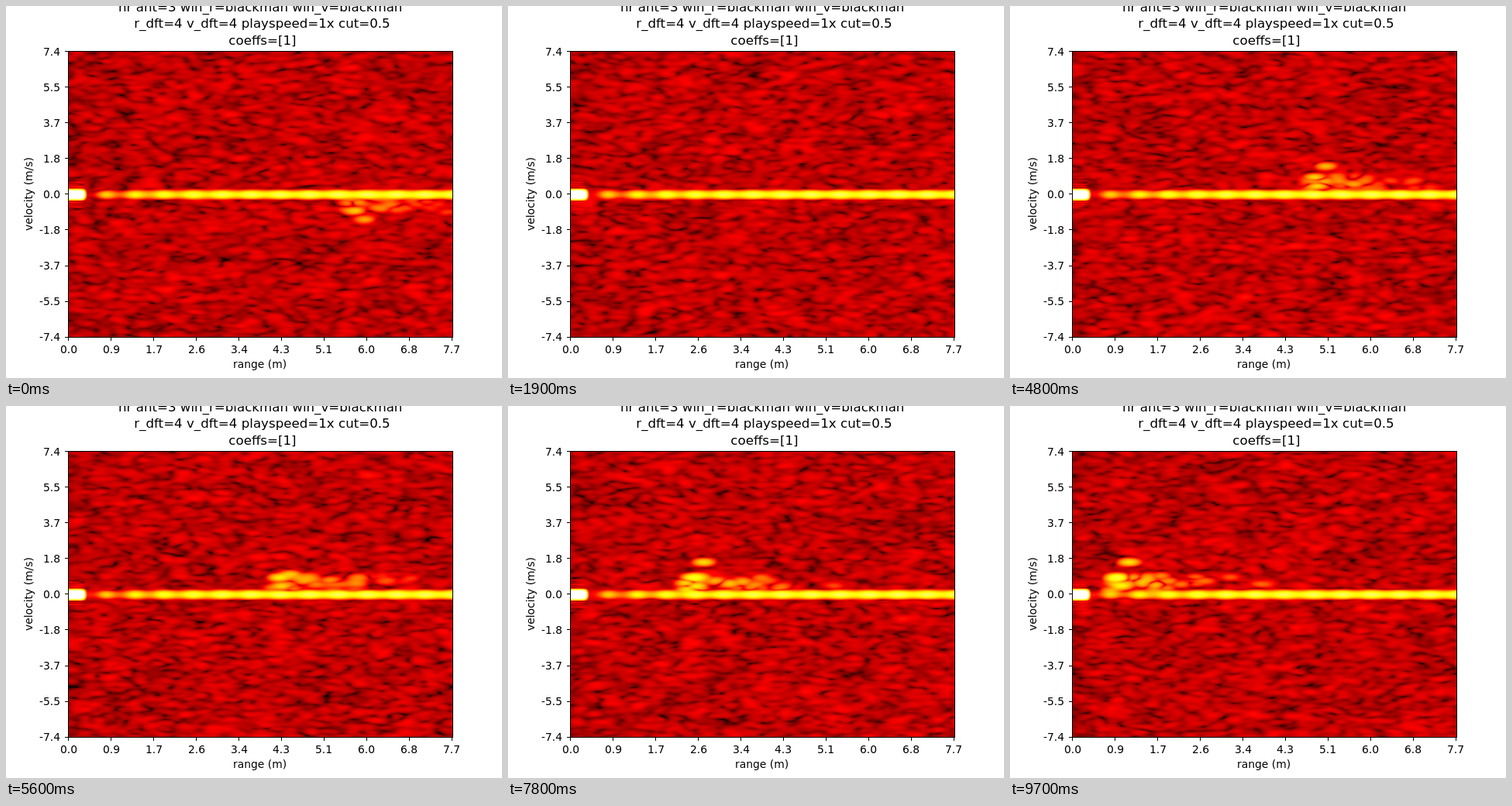
These frames come from a looping animation (640 px wide and 480 px high, 9800 ms). An HTML page with a canvas:

```html
<!DOCTYPE html>
<html lang="en">
<head>
<meta charset="utf-8">
<title>Range-velocity map</title>
<style>
  html, body { margin: 0; width: 100%; height: 100%; overflow: hidden; background: #fff; }
  canvas, svg { position: absolute; left: 0; top: 0; }
  text { font-family: "DejaVu Sans", sans-serif; font-size: 13.89px; white-space: pre; }
  .title { font-size: 16.67px; }
</style>
</head>
<body>
<canvas id="stage" width="640" height="480"></canvas>
<svg id="labels" width="640" height="480" viewBox="0 0 640 480"></svg>
<script>
const LOOP = 9800, STEP = 100;
const PLOT = { x: 81, y: 59, w: 495, h: 368 };
const RANGE_BINS = 64, VEL_BINS = 128, OVER = 4, TAPS = 6;
const COLS = RANGE_BINS * OVER, ROWS = VEL_BINS * OVER, MID = ROWS / 2;
const COL_PX = PLOT.w / COLS, ROW_PX = PLOT.h / ROWS;
const FLOOR = 0.268, DECADE = 0.28;   // colour level of the noise median and per factor of ten
const NOISE = 0.632;

const ctx = document.getElementById('stage').getContext('2d');
const labels = document.getElementById('labels');
const map = document.createElement('canvas');
map.width = COLS;
map.height = ROWS;
const mapCtx = map.getContext('2d');
const image = mapCtx.createImageData(COLS, ROWS);
const pixels = new Uint32Array(image.data.buffer);

const clamp = v => Math.max(0, Math.min(1, v));
const mix = (a, b, u) => a + (b - a) * u;
const wave = turns => Math.cos(2 * Math.PI * turns);
const amplitude = level => 10 ** ((level - FLOOR) / DECADE);

function randomFrom(seed) {
  let s = seed | 0;
  return () => {
    s = s + 0x6D2B79F5 | 0;
    let n = Math.imul(s ^ s >>> 15, 1 | s);
    n = n + Math.imul(n ^ n >>> 7, 61 | n) ^ n;
    return ((n ^ n >>> 14) >>> 0) / 4294967296;
  };
}

// Spectrum of a Blackman window, in bins, with peak 1.
const sinc = x => Math.abs(x) < 1e-9 ? 1 : Math.sin(Math.PI * x) / (Math.PI * x);
const lobe = d => (0.42 * sinc(d) + 0.25 * (sinc(d - 1) + sinc(d + 1)) +
                   0.04 * (sinc(d - 2) + sinc(d + 2))) / 0.42;
const phases = Array.from({ length: OVER }, (_, p) =>
  Array.from({ length: TAPS }, (_, k) => lobe(p / OVER - (k - 2))));

// "Hot" colour ramp.
const ramp = Uint32Array.from({ length: 1024 }, (_, i) => {
  const v = i / 1023;
  const channel = c => Math.round(255 * clamp(c));
  const r = channel(0.0416 + 0.9584 * v / 0.365);
  const g = channel((v - 0.365) / 0.381);
  const b = channel((v - 0.746) / 0.254);
  return 255 << 24 | b << 16 | g << 8 | r;
});

// Static echo on the zero-velocity line: a saturated start, then a rippled band.
function echoLevel(x) {
  const near = 1.2 - 0.35 * ((x - PLOT.x) / 20) ** 8;
  const fade = Math.exp(-(x - 110) / 65);
  const band = 0.8 - 0.3 * fade + (0.04 + 0.09 * fade) * wave((x - 128) / 37.5);
  return x < 106 ? Math.max(near, 0.33) : band;
}
const echo = Float32Array.from({ length: COLS }, (_, c) => amplitude(echoLevel(PLOT.x + c * COL_PX)));

// Reflecting parts of the walker: x, height above zero velocity, level.
function walkerParts(t, random) {
  const pace = Math.tanh(t - 1.9);               // walks off, turns, comes back
  const travel = 0.35 * Math.log(1 + Math.exp((t - 3.75) / 0.35));
  const x = 448 - 52 * travel, h = 22 * pace;
  const stride = 1.4 + 0.5 * wave((t - 7.8) / 0.95);
  const closeness = 0.08 * clamp(travel / 5);
  const parts = [];
  const add = (dx, height, level) =>
    parts.push([x + dx, height, mix(0.2, level + closeness, Math.abs(pace))]);

  add(0, h, 0.69);
  add(4, h * 0.5, 0.66);
  add(14, h * stride, 0.63);
  for (let n = 0; n < 5; n++) add(30 + 17 * n, h * (0.8 - 0.2 * (n % 2)), 0.56 - 0.03 * n);
  for (let n = 0; n < 24; n++) {
    const behind = 200 * random() ** 2;
    add(behind - 8, h * (0.2 + 0.9 * random()), 0.55 - 0.0009 * behind);
  }
  return parts;
}

const ANTENNAS = 2;
const bins = new Float32Array(RANGE_BINS * VEL_BINS);
const wide = new Float32Array(COLS * VEL_BINS);
const fields = Array.from({ length: 2 * ANTENNAS }, () => new Float32Array(COLS * ROWS));
const [re, im] = fields;

// Interpolates one line of bins to OVER times as many samples.
function expand(src, dst, count, start, stride) {
  for (let o = 0; o < count * OVER; o++) {
    const weights = phases[o % OVER], first = (o / OVER | 0) - 2 + count;
    let sum = 0;
    for (let k = 0; k < TAPS; k++) sum += weights[k] * src[start + (first + k) % count * stride];
    dst[start * (stride === 1 ? OVER : 1) + o * stride] = sum;
  }
}

function addNoise(random) {
  for (const field of fields) {
    for (let i = 0; i < bins.length; i++) {
      bins[i] = NOISE * (random() + random() + random() - 1.5);
    }
    for (let v = 0; v < VEL_BINS; v++) expand(bins, wide, RANGE_BINS, v * RANGE_BINS, 1);
    for (let c = 0; c < COLS; c++) expand(wide, field, VEL_BINS, c, COLS);
  }
}

function addEcho() {
  for (let dr = -36; dr <= 36; dr++) {
    const weight = lobe(dr / OVER);
    for (let c = 0; c < COLS; c++) re[(MID + dr) * COLS + c] += weight * echo[c];
  }
}

function addReflection([x, up, level], phase) {
  const col = (x - PLOT.x) / COL_PX, row = MID - up / ROW_PX, reach = 3 * OVER;
  const a = amplitude(level) * Math.cos(phase), b = amplitude(level) * Math.sin(phase);
  for (let r = Math.ceil(row - reach); r <= row + reach; r++) {
    const weight = lobe((r - row) / OVER);
    for (let c = Math.max(0, Math.ceil(col - reach)); c <= Math.min(COLS - 1, col + reach); c++) {
      const w = weight * lobe((c - col) / OVER), i = r * COLS + c;
      re[i] += a * w;
      im[i] += b * w;
    }
  }
}

function render(step) {
  const random = randomFrom(step * 7919 + 17);
  addNoise(random);
  addEcho();
  walkerParts(step * STEP / 1000, random)
    .forEach(part => addReflection(part, 2 * Math.PI * random()));
  for (let i = 0; i < pixels.length; i++) {
    let power = 1e-6;
    for (const field of fields) power += field[i] * field[i];
    const edge = 0.035 * Math.exp(-(i % COLS) / 6);
    const level = FLOOR + DECADE / 2 * Math.log10(power) - edge;
    pixels[i] = ramp[Math.round(1023 * clamp(level))];
  }
  mapCtx.putImageData(image, 0, 0);
  ctx.drawImage(map, PLOT.x, PLOT.y, PLOT.w, PLOT.h);
}

// Places text on whole pixels; align is 0.5 for centred and 1 for right-aligned.
function label(text, x, y, { align = 0.5, className = '', turn = 0 } = {}) {
  const node = document.createElementNS('http://www.w3.org/2000/svg', 'text');
  node.textContent = text;
  node.setAttribute('class', className);
  labels.append(node);
  const shift = align * node.getComputedTextLength();
  if (turn) {
    node.setAttribute('transform', `translate(${x} ${Math.round(y + shift)}) rotate(${turn})`);
  } else {
    node.setAttribute('x', Math.round(x - shift));
    node.setAttribute('y', Math.round(y));
  }
}

function drawAxes() {
  ctx.fillStyle = '#fff';
  ctx.fillRect(0, 0, 640, 480);
  ctx.fillStyle = '#000';
  ctx.fillRect(80, 58, 497, 370);
  for (let i = 0; i <= 9; i++) {
    const x = 80.97 + 54.9 * i;
    ctx.fillRect(Math.round(x - 0.5), 428, 1, 4);
    label((7.7 * i / 9).toFixed(1), x, 448);
  }
  for (let i = 0; i <= 8; i++) {
    const y = 57.96 + 46.1 * i;
    ctx.fillRect(76, Math.round(y), 4, 1);
    label((7.38 - 1.845 * i).toFixed(1), 70.3, y + 5.6, { align: 1 });
  }
  const title = { className: 'title' };
  label('nr ant=3 win_r=blackman win_v=blackman', 328, 7, title);
  label(' r_dft=4 v_dft=4 playspeed=1x cut=0.5', 328, 28, title);
  label(' coeffs=[1]', 328, 50, title);
  label('range (m)', 328, 467);
  label('velocity (m/s)', 34, 242.5, { turn: -90 });
}

let shown = -1;
const start = performance.now();
function tick() {
  const step = Math.floor((performance.now() - start) % LOOP / STEP);
  if (step !== shown) render(shown = step);
  requestAnimationFrame(tick);
}

drawAxes();
tick();
</script>
</body>
</html>
```
